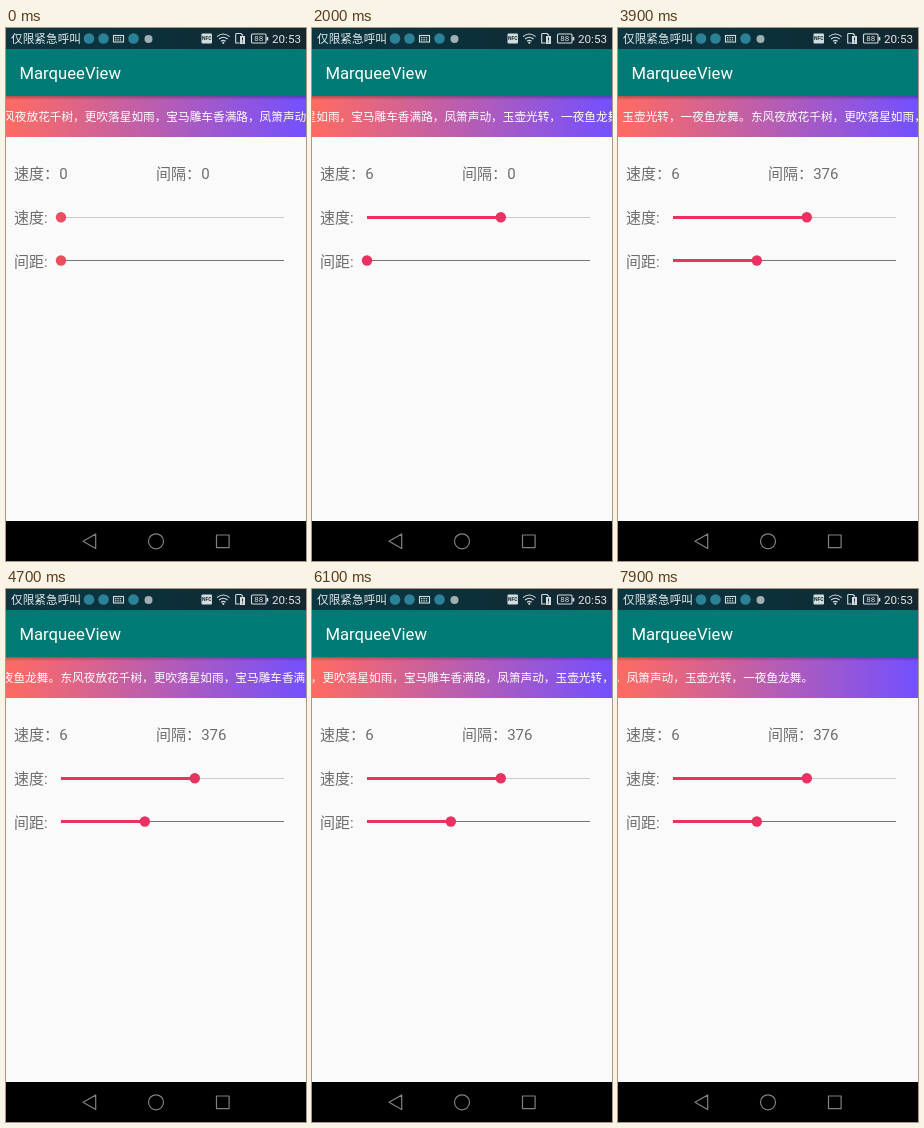
Write an HTML page that moves like this. It is 300 px wide and 533 px high and loops after 8000 ms.

```html
<!DOCTYPE html>
<html lang="zh-CN">
<head>
<meta charset="utf-8">
<title>MarqueeView</title>
<style>
  html, body { margin: 0; width: 100%; height: 100%; overflow: hidden; background: #fafafa; }
  svg { display: block; width: 100%; height: 100%; }
  text { font-family: Roboto, "Noto Sans CJK SC", "Noto Sans CJK", sans-serif; }
  .small { font-size: 11.667px; }
  .label { font-size: 15px; fill: #6e6c70; }
  .line { fill: none; stroke: #d3dde0; stroke-width: 1.1; }
  .nav { fill: none; stroke: #808080; stroke-width: 1.2; stroke-linejoin: round; }
</style>
</head>
<body>
<svg viewBox="0 0 300 533">
  <defs>
    <linearGradient id="status">
      <stop offset="0" stop-color="#0c3742"/>
      <stop offset=".5" stop-color="#0b303a"/>
      <stop offset="1" stop-color="#15262e"/>
    </linearGradient>
    <linearGradient id="banner">
      <stop offset="0" stop-color="#ff6b62"/>
      <stop offset="1" stop-color="#7350ff"/>
    </linearGradient>
    <linearGradient id="shade" x2="0" y2="1">
      <stop offset="0" stop-color="#000" stop-opacity=".28"/>
      <stop offset="1" stop-color="#000" stop-opacity="0"/>
    </linearGradient>
  </defs>

  <rect width="300" height="533" fill="#fafafa"/>

  <!-- status bar -->
  <rect width="300" height="21" fill="url(#status)"/>
  <text class="small" x="5" y="15" fill="#e4eaec">仅限紧急呼叫</text>
  <g fill="#2b8296">
    <circle cx="83" cy="10.5" r="5.3"/>
    <circle cx="97.5" cy="10.5" r="5.3"/>
    <circle cx="127.5" cy="10.5" r="5.3"/>
  </g>
  <rect class="line" x="107.5" y="7.5" width="10" height="6.5"/>
  <path class="line" d="M109 9.6h7M109 11.9h7" stroke-dasharray="1.4 1"/>
  <circle cx="142.5" cy="11" r="4" fill="#9fb0b5"/>
  <rect x="195.5" y="5.5" width="10.5" height="10" rx="1" fill="#d3dde0"/>
  <text x="200.75" y="12.4" font-size="5" font-weight="700" text-anchor="middle" fill="#12303a">NFC</text>
  <g class="line">
    <path d="M211 8.6Q217.3 3.4 223.6 8.6M213 11Q217.3 7.4 221.6 11M215 13.3Q217.3 11.5 219.6 13.3"/>
    <path d="M230 5.5h5l2 2M229.7 5.5v9.5h4"/>
    <rect x="245.5" y="6" width="14.5" height="9" rx="1"/>
  </g>
  <circle cx="217.3" cy="14.8" r="1.1" fill="#d3dde0"/>
  <rect x="234" y="8" width="5" height="8" fill="#d3dde0"/>
  <path d="M236.5 9.5v3M236.5 13.5v1" stroke="#12303a"/>
  <rect x="260.5" y="9" width="1.8" height="3.5" fill="#d3dde0"/>
  <text x="252.8" y="13.3" font-size="8" text-anchor="middle" fill="#d3dde0">88</text>
  <text class="small" x="266" y="15" fill="#dfe6e8">20:53</text>

  <!-- app bar -->
  <rect y="21" width="300" height="47" fill="#007a75"/>
  <text x="13.5" y="51" font-size="16.667" fill="#fff">MarqueeView</text>

  <!-- marquee -->
  <rect y="68" width="300" height="41" fill="url(#banner)"/>
  <rect y="68" width="300" height="4" fill="url(#shade)"/>
  <g id="track" class="small" fill="#fff"></g>

  <!-- controls -->
  <text class="label" x="8" y="150.7">速度：</text>
  <text class="label" x="53.2" y="150.7" id="speedText"></text>
  <text class="label" x="150" y="150.7">间隔：</text>
  <text class="label" x="195.2" y="150.7" id="gapText"></text>
  <text class="label" x="8" y="194.9">速度:</text>
  <text class="label" x="8" y="238.6">间距:</text>
  <path d="M55 189.5H278" stroke="#cacaca"/>
  <path d="M55 232.5H278" stroke="#747474"/>
  <g id="sliders">
    <path stroke-width="2.8"/>
    <circle cy="189.3" r="5.2" stroke="none"/>
    <path stroke-width="2.8"/>
    <circle cy="232.5" r="5.2" stroke="none"/>
  </g>

  <!-- navigation bar -->
  <rect y="493" width="300" height="40" fill="#000"/>
  <path class="nav" d="M77 513.3L89.7 506V520.6Z"/>
  <circle class="nav" cx="150" cy="513.3" r="7.5"/>
  <rect class="nav" x="210.5" y="507" width="12.6" height="12.6"/>
</svg>

<script>
  const LOOP = 8000, STEP = 100;
  const VERSE = "东风夜放花千树，更吹落星如雨，宝马雕车香满路，凤箫声动，玉壶光转，一夜鱼龙舞。";
  const SIZE = 35 / 3, WIDTH = VERSE.length * SIZE;
  const SPEED = 6, GAP = 376, SCALE = 300 / 1080;
  const UNIT = 0.0981 / SPEED;   // px per ms for each speed level
  const START = -14.5;
  const SPEED_DRAG = [500, 1030], GAP_DRAG = [3000, 3700];

  const $ = id => document.getElementById(id);
  const clamp = v => Math.min(1, Math.max(0, v));
  const progress = (t, [from, to]) => clamp((t - from) / (to - from));
  const smooth = p => p * p * (3 - 2 * p);

  // The gap only takes effect from the third copy on
  const offsets = [0, WIDTH, 2 * WIDTH + GAP * SCALE];
  for (const x of offsets) {
    const copy = document.createElementNS("http://www.w3.org/2000/svg", "text");
    copy.setAttribute("x", x);
    copy.setAttribute("y", 93.3);
    copy.textContent = VERSE;
    $("track").append(copy);
  }

  // Moment at which the speed slider reaches a level
  const levelTime = k => SPEED_DRAG[0] + (k - 0.5) / SPEED * (SPEED_DRAG[1] - SPEED_DRAG[0]);

  function scrollAt(t) {
    let x = START;
    for (let k = 1; k <= SPEED; k++) x -= UNIT * Math.max(0, t - levelTime(k));
    return x;
  }

  const [speedBar, speedThumb, gapBar, gapThumb] = $("sliders").children;

  function setSlider(bar, thumb, y, value) {
    const x = 55 + 223 * value;
    bar.setAttribute("d", `M55 ${y}H${x}`);
    thumb.setAttribute("cx", x);
  }

  function draw(t) {
    const speed = Math.round(SPEED * progress(t, SPEED_DRAG));
    const gap = Math.round(GAP * smooth(progress(t, GAP_DRAG)));
    const accent = speed ? "#e93262" : "#e6505f";
    $("track").setAttribute("transform", `translate(${scrollAt(t)})`);
    $("speedText").textContent = speed;
    $("gapText").textContent = gap;
    $("sliders").setAttribute("fill", accent);
    $("sliders").setAttribute("stroke", accent);
    setSlider(speedBar, speedThumb, 189.5, speed / 10);
    setSlider(gapBar, gapThumb, 232.5, gap / 1000);
  }

  const begin = performance.now();
  function tick() {
    const t = (performance.now() - begin) % LOOP;
    draw(Math.floor(t / STEP) * STEP);
    requestAnimationFrame(tick);
  }
  tick();
</script>
</body>
</html>
```
